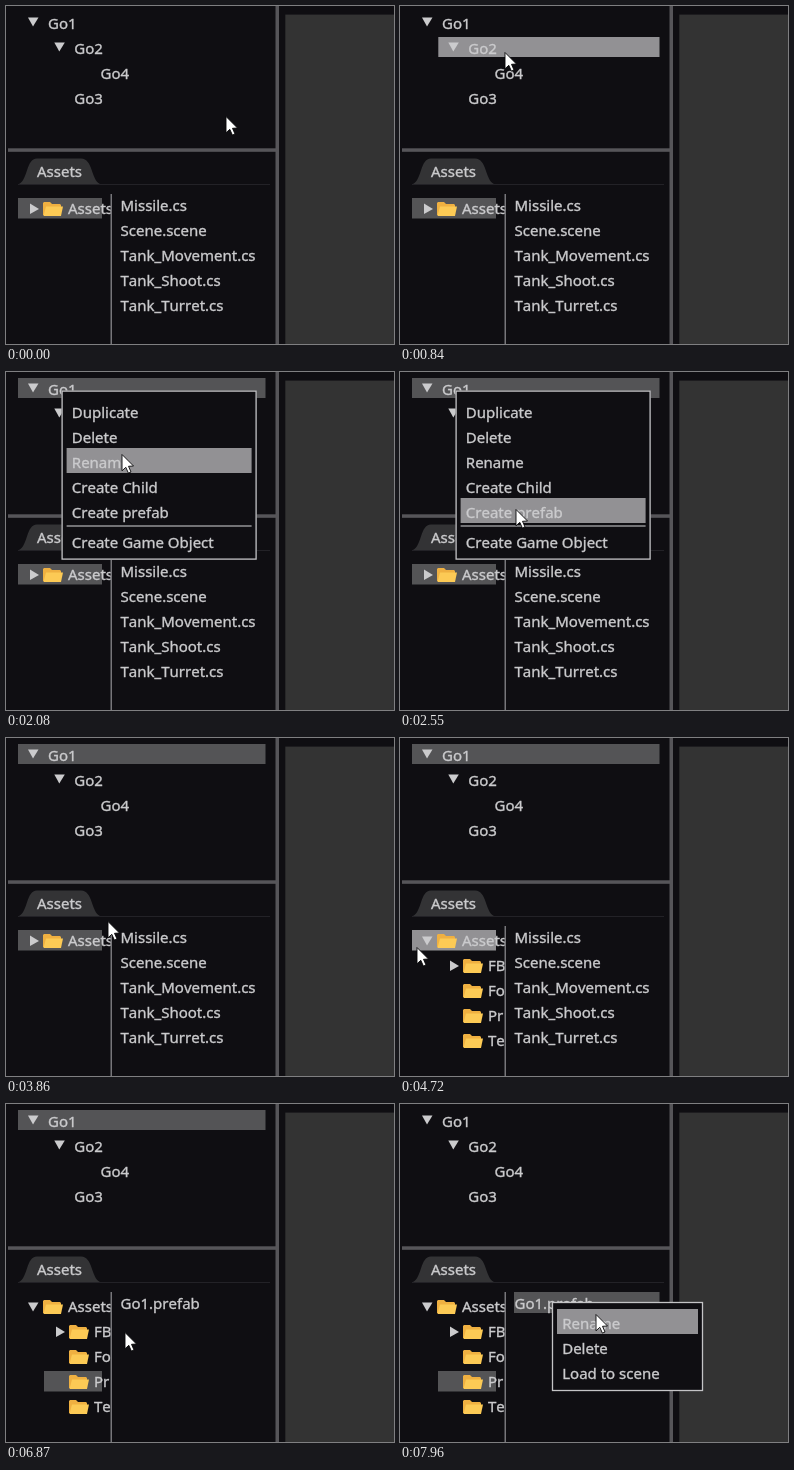
These frames come from a looping animation (388x338 px, 8000 ms). An HTML page with a canvas:

```html
<!DOCTYPE html>
<html lang="en">
<head>
<meta charset="utf-8">
<title>Prefab workflow</title>
<style>
  html, body { margin: 0; width: 100%; height: 100%; overflow: hidden; background: #0f0e12; }
  canvas { display: block; }
</style>
</head>
<body>
<canvas id="stage" width="388" height="338"></canvas>
<script>
const ctx = document.getElementById('stage').getContext('2d');
const LOOP = 8000;
const BG = '#0f0e12', TEXT = '#cbcbcd', PICKED = '#545456', HOVER = '#929194';

// Moments at which the interface changes state
const AT = { menu: 1460, menuDone: 2930, expand: 4640, openFolder: 6180, fileMenu: 7420 };

// Cursor moves: start, end, number of steps, target x and y, easing
const smooth = p => p * p * (3 - 2 * p);
const easeOut = p => 1 - (1 - p) ** 2;
const linear = p => p;
const START = [220, 110];
const MOVES = [
  [380, 1140, 11, 55, 18, smooth],
  [1690, 2080, 6, 116, 82, smooth],
  [2150, 2150, 1, 117, 106, linear],
  [2320, 2550, 4, 116, 137, smooth],
  [3860, 3860, 1, 102, 183, linear],
  [3940, 4170, 4, 18, 211, easeOut],
  [4340, 4340, 1, 17, 210, linear],
  [4490, 4490, 1, 17, 209, linear],
  [5030, 5490, 7, 55, 244, smooth],
  [5640, 5950, 5, 66, 271, smooth],
  [6020, 6100, 2, 67, 273, linear],
  [6580, 7040, 7, 152, 198, smooth],
  [7800, 7960, 3, 196, 210, easeOut]
];

function cursorAt(t) {
  let [x, y] = START;
  for (const [from, to, steps, tx, ty, ease] of MOVES) {
    if (t < from) break;
    const gap = (to - from) / (steps - 1 || 1) || 1;
    const step = Math.min(steps, Math.floor((t - from + 2) / gap) + 1);
    const p = ease(step / steps);
    x += (tx - x) * p;
    y += (ty - y) * p;
  }
  return [Math.round(x), Math.round(y)];
}

function rect(x, y, w, h, color) {
  ctx.fillStyle = color;
  ctx.fillRect(x, y, w, h);
}

function shape(points, color) {
  ctx.beginPath();
  points.forEach(([x, y]) => ctx.lineTo(x, y));
  ctx.closePath();
  ctx.fillStyle = color;
  ctx.fill();
}

// A hairline stroke gives the regular face a medium weight
function label(text, x, y) {
  ctx.fillStyle = ctx.strokeStyle = TEXT;
  ctx.lineWidth = 0.35;
  ctx.fillText(text, x, y);
  ctx.strokeText(text, x, y);
}

function arrow(x, y, open) {
  shape(open ? [[x - 5, y - 4.5], [x + 5.5, y - 4.5], [x, y + 4.5]]
             : [[x - 3, y - 5.5], [x + 6, y], [x - 3, y + 5]], TEXT);
}

function folder(x, y) {
  shape([[x, y + 1], [x + 1, y], [x + 7, y], [x + 9, y + 2], [x + 17, y + 2],
         [x + 18, y + 3], [x + 18, y + 13], [x, y + 13]], '#efb041');
  shape([[x + 3, y + 4.5], [x + 20, y + 4.5], [x + 18, y + 14], [x + 0.5, y + 14]], '#fcca55');
}

const inside = ([px, py], [x, y, w, h]) => px >= x && px < x + w && py >= y && py < y + h;

function rowBack(box, mouse, picked) {
  const over = mouse && inside(mouse, box);
  if (over || picked) rect(...box, over ? HOVER : PICKED);
}

function hierarchy(t, mouse) {
  const rows = [['Go1', 0, true], ['Go2', 1, true], ['Go4', 2, false], ['Go3', 1, false]];
  rows.forEach(([name, depth, parent], i) => {
    const x = 12 + depth * 26.3, y = 6 + i * 25;
    rowBack([x, y, 259.5 - x, 20], mouse, i === 0 && t >= AT.menu && t < AT.fileMenu);
    if (parent) arrow(x + 15, y + 10, true);
    label(name, x + 30, y + 17);
  });
}

function frame() {
  rect(0, 0, 388, 338, BG);
  rect(269.5, 0, 3.5, 338, '#565559');
  rect(2, 142.3, 268, 3.5, '#565559');
  rect(279.3, 8.6, 109, 330, '#333333');
  rect(12, 178, 252, 1, '#232227');
  ctx.beginPath();
  ctx.moveTo(13, 178);
  ctx.bezierCurveTo(22, 174, 20, 152.5, 31, 152.5);
  ctx.lineTo(75, 152.5);
  ctx.bezierCurveTo(87, 152.5, 85, 174, 94, 178);
  ctx.fillStyle = '#333335';
  ctx.fill();
  label('Assets', 31, 171);
}

function assetTree(t, mouse) {
  const open = t >= AT.expand, inPrefabs = t >= AT.openFolder;
  ctx.save();
  ctx.beginPath();
  ctx.rect(0, 188, 105, 150);
  ctx.clip();
  rowBack([12, 192, 84, 20.5], mouse, !inPrefabs);
  arrow(27, 203, open);
  folder(37, 196);
  label('Assets', 62, 208);
  if (open) {
    ['FB', 'Fo', 'Pr', 'Te'].forEach((name, i) => {
      const y = 217 + i * 25;
      rowBack([38, y, 58, 20.5], mouse, i === 2 && inPrefabs);
      if (i === 0) arrow(53, y + 11, false);
      folder(63, y + 4);
      label(name, 88, y + 16);
    });
  }
  ctx.restore();
  rect(104.5, 188, 1.5, 150, '#77767a');
}

function fileList(t, mouse) {
  const files = t >= AT.openFolder ? ['Go1.prefab']
    : ['Missile.cs', 'Scene.scene', 'Tank_Movement.cs', 'Tank_Shoot.cs', 'Tank_Turret.cs'];
  files.forEach((name, i) => {
    const y = 188 + i * 25;
    rowBack([114, y, 145.5, 21], mouse, t >= AT.fileMenu);
    label(name, 114.5, y + 17);
  });
}

function menu(x, y, w, h, items, rowTop, mouse) {
  rect(x, y, w, h, BG);
  ctx.strokeStyle = '#c4c4c6';
  ctx.lineWidth = 1.3;
  ctx.strokeRect(x + 0.5, y + 0.5, w - 1, h - 1);
  items.forEach((name, i) => {
    const split = name === 'Create Game Object';
    const top = rowTop + i * 25 + (split ? 5 : 0);
    if (split) rect(x + 5, top - 2.6, w - 10, 1.2, '#b4b4b6');
    rowBack([x + 5, top, w - 10, 25], mouse, false);
    label(name, x + 10.2, top + 20);
  });
}

function pointer([x, y]) {
  ctx.save();
  ctx.translate(x, y + 0.5);
  ctx.beginPath();
  [[0, 0], [0, 16.3], [3.8, 12.8], [6.4, 18.6], [9, 17.5], [6.5, 11.8], [11.5, 11.5]]
    .forEach(([px, py]) => ctx.lineTo(px, py));
  ctx.closePath();
  ctx.fillStyle = '#fff';
  ctx.fill();
  ctx.strokeStyle = '#08080a';
  ctx.lineWidth = 0.9;
  ctx.stroke();
  ctx.restore();
}

function draw(t) {
  const mouse = cursorAt(t);
  const objectMenu = t >= AT.menu && t < AT.menuDone;
  const fileMenu = t >= AT.fileMenu;
  const free = objectMenu || fileMenu ? null : mouse;
  ctx.font = '15px "Noto Sans", "Open Sans", sans-serif';
  ctx.fontKerning = 'none';
  frame();
  hierarchy(t, free);
  assetTree(t, free);
  fileList(t, free);
  if (objectMenu) {
    menu(55.6, 18.6, 195, 169, ['Duplicate', 'Delete', 'Rename', 'Create Child',
      'Create prefab', 'Create Game Object'], 26, mouse);
  }
  if (fileMenu) menu(152, 198, 151, 89, ['Rename', 'Delete', 'Load to scene'], 205, mouse);
  pointer(mouse);
}

const begin = performance.now();
function tick() {
  draw((performance.now() - begin) % LOOP);
  requestAnimationFrame(tick);
}
tick();
</script>
</body>
</html>
```
